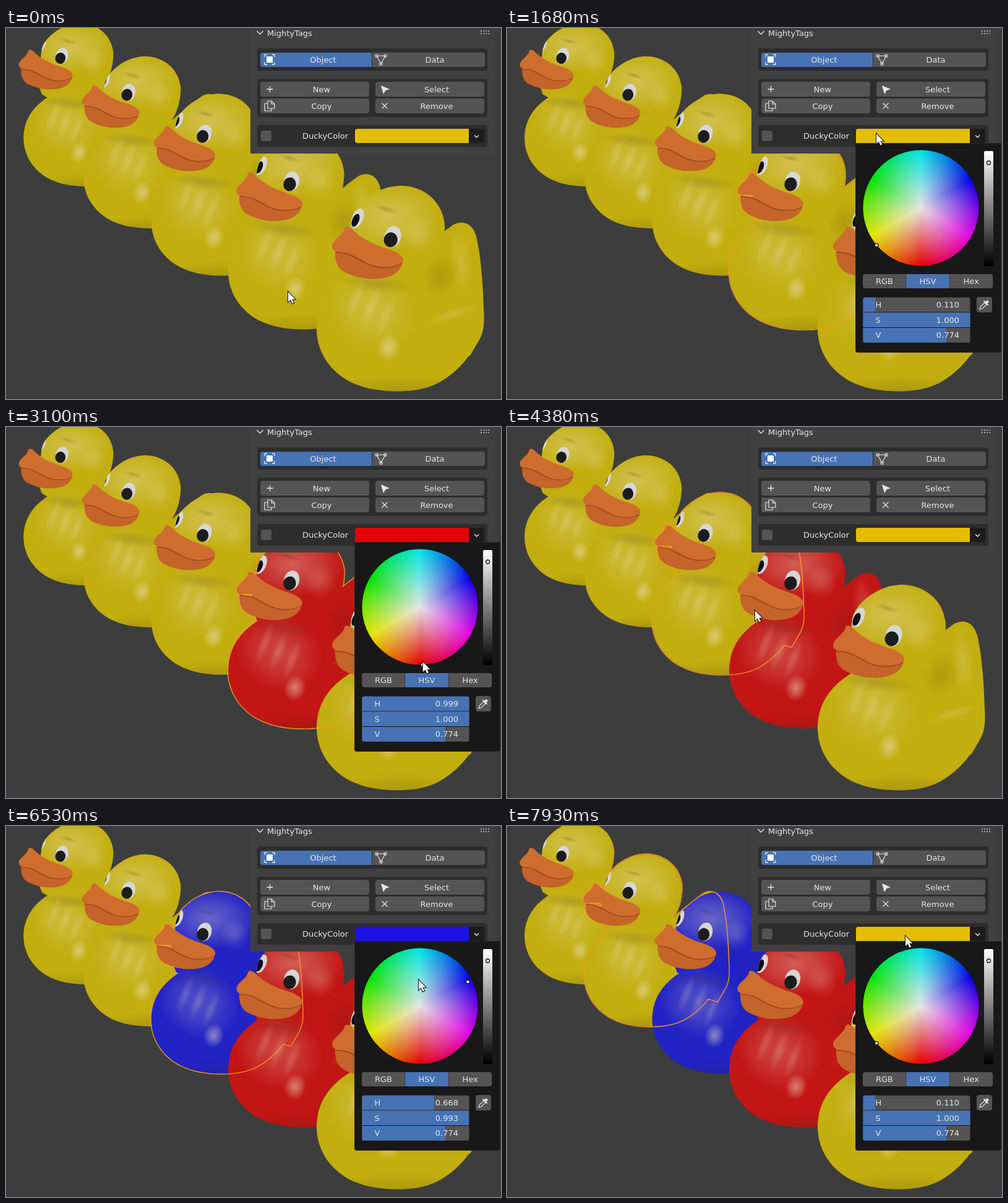
An HTML page with a canvas that plays this animation: 800 by 600 pixels, repeating every 8000 ms.

```html
<!DOCTYPE html>
<html lang="en">
<head>
<meta charset="utf-8">
<title>Ducky colours</title>
<style>
html, body { margin: 0; width: 100%; height: 100%; overflow: hidden; background: #3d3d3d; }
canvas { display: block; }
</style>
</head>
<body>
<canvas id="stage" width="800" height="600"></canvas>
<script>
const c = document.getElementById('stage').getContext('2d');
const LOOP = 8000, STEP = 141.8, TAU = Math.PI * 2;
const WHEEL = { x: 669, y: 291, r: 93.5 }, VALUE = 227.8;
const GREY = '#545454', BLUE = '#4772b3', TEXT = '#e6e6e6';
const YELLOW = [597.3, 351.26], RED = [672.95, 384.5];

// The row recedes to one vanishing point: a part of the duck n places back
// is the nearest duck's part shrunk towards that point by 1 / (1 + n * rate).
const VANISH = { x: -1574, y: -865 };
const RATE = { tail: .0714, body: .0739, head: .0766, beak: .0794, left: .0785, right: .0803 };
const SHAPE = {
  tail: 'M750 530L764 506C774 490 773 470 772 455C771 420 768 370 760 337C753 311 731 311 719 321C702 333 680 352 651 376L600 480Z',
  body: 'M562 395C518 420 502 452 502 488C503 530 530 562 565 576C595 589 650 592 685 580C722 567 750 532 764 506C774 490 772 470 771 450C750 415 700 395 690 370Z',
  head: 'M600 430C680 425 709 370 709 318C705 277 672 255 637 255C605 256 580 275 567 291C558 303 557 315 556 325L545 370L558 405Z'
};
const UPPER = new Path2D('M527 354C527 342 545 336 547 324C549 319 556 321 562 328C580 345 600 352 625 360C640 366 644 374 641 379C637 388 620 388 605 386C580 383 570 366 548 363C535 362 528 361 527 354Z');
const LOWER = new Path2D('M532 360C531 378 536 390 550 396C575 408 605 408 622 401C635 395 640 386 641 378L600 376L560 360Z');
const SEAM = new Path2D('M533 363C560 361 570 380 598 386C612 389 630 387 640 381');

function at(x, y, r = 1, ry = r, turn = 0) {
  return new DOMMatrix().translate(x, y).rotate(turn).scale(r, ry);
}
function back(n, part) {
  const f = 1 / (1 + n * RATE[part]);
  return new DOMMatrix([f, 0, 0, f, VANISH.x * (1 - f), VANISH.y * (1 - f)]);
}
const ducks = [4, 3, 2, 1, 0].map(n => {
  const parts = Object.keys(SHAPE).map(name => {
    const p = new Path2D();
    p.addPath(new Path2D(SHAPE[name]), back(n, name));
    return p;
  });
  const hull = new Path2D(), beak = new Path2D();
  parts.forEach(p => hull.addPath(p));
  [UPPER, LOWER].forEach(p => beak.addPath(p, back(n, 'beak')));
  return { n, hull, parts: [...parts, beak] };
});

// Timing
const MOVES = [[271, 1120, 597, 171], [1960, 2667, 674, 380], [3100, 3660, 401, 297],
  [4380, 4956, 610, 172], [5377, 5510, 667, 249], [6530, 7070, 228, 228], [7070, 7500, 644, 178]];
const DRAG = [[5510, 5802, 714.6, 268.65], [5802, 6227, 746.4, 251.9]];

const lerp = (a, b, k) => a + (b - a) * k;
const within = (t, a, b) => t >= a && t < b;
const snap = t => Math.max(0, Math.floor((t - 105) / STEP) * STEP + 130);
function follow(moves, t, x, y) {
  for (const [a, b, u, v] of moves) {
    const k = Math.min(1, Math.max(0, (t - a) / (b - a)));
    const ease = k * k * (3 - 2 * k);
    x = lerp(x, u, ease);
    y = lerp(y, v, ease);
  }
  return [x, y];
}

// Colours: a point on the wheel gives hue and saturation.
function wheelColour([x, y]) {
  const dx = x - WHEEL.x, dy = y - WHEEL.y;
  const hue = ((Math.atan2(dy, dx) - Math.PI / 2) / TAU + 1) % 1;
  const sat = Math.min(1, Math.hypot(dx, dy) / WHEEL.r);
  return [5, 3, 1].map(n => {
    const k = (n + hue * 6) % 6;
    return VALUE * (1 - sat * Math.max(0, Math.min(k, 4 - k, 1)));
  });
}
function linearHsv(rgb) {
  const [r, g, b] = rgb.map(v => v / 255 <= .04045 ? v / 255 / 12.92 : ((v / 255 + .055) / 1.055) ** 2.4);
  const hi = Math.max(r, g, b), d = hi - Math.min(r, g, b);
  const h = !d ? 0 : hi === r ? (g - b) / d + 6 : hi === g ? (b - r) / d + 2 : (r - g) / d + 4;
  return [h / 6 % 1, d / hi, hi];
}
const css = rgb => `rgb(${rgb.map(Math.round)})`;
const skin = ([r, g, b]) => css([r * .8 + 12, g * .8 + 22, b * .8 + 14]);

function box(x, y, w, h, fill, r = 4) {
  c.beginPath();
  c.roundRect(x, y, w, h, r);
  c.fillStyle = fill;
  c.fill();
}
function text(s, x, y, align = 'center') {
  c.font = '13px "DejaVu Sans", sans-serif';
  c.textAlign = align;
  c.fillStyle = TEXT;
  c.fillText(s, x, y);
}
function line(d, width = 1.3, colour = TEXT) {
  c.strokeStyle = colour;
  c.lineWidth = width;
  c.stroke(new Path2D(d));
}
function shape(path, colour = TEXT) {
  c.fillStyle = colour;
  c.fill(path);
}
function dot(x, y, r) {
  c.beginPath();
  c.arc(x, y, r, 0, TAU);
  c.fillStyle = '#fff';
  c.fill();
  c.strokeStyle = '#111';
  c.lineWidth = 1.3;
  c.stroke();
}

// Soft light (tone > 0) or shade (tone < 0) in the nearest duck's coordinates.
function glow(base, x, y, rx, ry, turn, tone) {
  const ink = tone > 0 ? '240,228,205' : '35,25,10', a = Math.abs(tone);
  const g = c.createRadialGradient(0, 0, 0, 0, 0, 1);
  [1, .55, 0].forEach((v, i) => g.addColorStop(i / 2, `rgba(${ink},${a * v})`));
  c.setTransform(base.multiply(at(x, y, rx, ry, turn)));
  c.fillStyle = g;
  c.fillRect(-1, -1, 2, 2);
}
function oval(base, x, y, rx, ry, turn, colour) {
  c.setTransform(base);
  c.beginPath();
  c.ellipse(x, y, rx, ry, turn, 0, TAU);
  c.fillStyle = colour;
  c.fill();
}

function drawDuck({ n, hull }, rgb) {
  const body = back(n, 'body'), head = back(n, 'head');
  const left = back(n, 'left'), right = back(n, 'right');
  c.save();
  shape(hull, skin(rgb));
  c.clip(hull);
  glow(body, 640, 594, 140, 34, 0, -.16);
  glow(body, 598, 414, 60, 15, 6, -.16);
  glow(body, 702, 400, 28, 36, 25, -.12);
  glow(body, 590, 455, 78, 66, 25, .24);
  for (let i = 0; i < 3; i++) glow(body, 565 + i * 24, 440 + i * 14, 10, 38, 22, .2);
  glow(body, 618, 517, 19, 23, 15, .5);
  glow(body, 736, 378, 18, 55, -6, .2);
  glow(body, 722, 463, 46, 9, -18, .2);
  glow(head, 620, 305, 88, 56, 0, .34);
  glow(head, 668, 335, 28, 30, 0, .2);
  glow(head, 614, 293, 20, 5, 15, -.18);
  oval(left, 568, 308, 9, 17, .4, '#d6d6d6');
  oval(left, 565, 311, 5.4, 11, .4, '#0c0c0c');
  oval(right, 625, 337.5, 13.3, 17.5, .25, '#d6d6d6');
  oval(right, 621.7, 342.5, 11, 12, .2, '#1c1c1c');
  c.restore();

  c.save();
  c.setTransform(back(n, 'beak'));
  shape(LOWER, '#c4632a');
  shape(UPPER, '#cf6d2f');
  c.strokeStyle = 'rgba(120,50,15,.5)';
  c.lineWidth = 1.8;
  c.stroke(SEAM);
  c.restore();
}

// Clipping away every part leaves only the outer edge; it shows through ducks in front.
function drawOutline({ parts }) {
  c.save();
  for (const p of parts) {
    const outside = new Path2D();
    outside.rect(-200, -200, 1200, 1000);
    outside.addPath(p);
    c.clip(outside, 'evenodd');
  }
  c.strokeStyle = 'rgba(247,154,44,.9)';
  c.lineWidth = 3;
  c.lineJoin = 'round';
  parts.forEach(p => c.stroke(p));
  c.restore();
}

function drawPanel(swatch, open) {
  c.fillStyle = '#404040';
  c.fillRect(395, 0, 395, 203);
  line('M405.5 5L410.5 10L415.5 5');
  text('MightyTags', 422, 13, 'left');
  c.fillStyle = '#a0a0a0';
  for (let i = 0; i < 8; i++) c.fillRect(767 + i % 4 * 4, i < 4 ? 4 : 8, 2, 2);

  box(406, 33, 372, 36, '#2d2d2d');
  box(406, 82, 372, 62, '#2d2d2d');
  box(406, 157, 372, 35, '#2d2d2d');
  box(411, 40, 180, 23, BLUE, [4, 0, 0, 4]);
  box(592, 39.5, 182, 23.5, GREY, [0, 4, 4, 0]);
  text('Object', 512.5, 56);
  text('Data', 693, 56);
  ['New', 'Select', 'Copy', 'Remove'].forEach((s, i) => {
    const x = 411 + i % 2 * 186, y = i < 2 ? 87 : 114;
    box(x, y, 176, 24, GREY);
    text(s, x + 99, y + 17);
  });

  c.fillStyle = '#fff';
  c.fillRect(421, 46, 10, 10);
  line('M418 47V43H422M430 43H434V47M434 55V59H430M422 59H418V55');
  line('M599 45L606 58L613 45Z', 1.1);
  line('M597 43h4v4h-4zM611 43h4v4h-4zM604 56h4v4h-4z', 1);
  line('M426.5 94V104M421.5 99H431.5');
  shape(new Path2D('M606 93L620 99L613.5 101L610 107Z'));
  line('M423 118H429L434 123V130H423ZM429 118V123H434M423 122H418V134H429V130', 1.2);
  line('M607.5 121.5L616.5 130.5M616.5 121.5L607.5 130.5');

  box(412, 166, 17, 17, GREY, 3);
  text('DuckyColor', 479, 179, 'left');
  box(564, 163, 184, open ? 24 : 23, swatch, open ? [4, 0, 0, 0] : [4, 0, 0, 4]);
  box(748, 163, 25, 23, '#1c1c1c', [0, 4, 4, 0]);
  line('M757 173.5L760.5 177L764 173.5', 1.5);
}

function drawPopup(mark, rgb) {
  const { x, y, r } = WHEEL;
  box(563, 186, 236, 339, '#252525', [0, 0, 4, 4]);
  box(564, 187, 234, 337, '#181818', [0, 0, 4, 4]);

  const hues = c.createConicGradient(Math.PI / 2, x, y);
  for (let i = 0; i <= 6; i++) {
    const a = Math.PI / 2 + i * TAU / 6;
    hues.addColorStop(i / 6, css(wheelColour([x + Math.cos(a) * r, y + Math.sin(a) * r])));
  }
  const fade = c.createRadialGradient(x, y, 0, x, y, r);
  fade.addColorStop(0, 'rgba(228,228,228,1)');
  fade.addColorStop(1, 'rgba(228,228,228,0)');
  c.beginPath();
  c.arc(x, y, r, 0, TAU);
  for (const fill of [hues, fade]) {
    c.fillStyle = fill;
    c.fill();
  }
  const bar = c.createLinearGradient(0, 199, 0, 384);
  bar.addColorStop(0, '#fff');
  bar.addColorStop(1, '#000');
  box(771, 199, 15, 186, bar, 2);
  dot(778.5, 218, 3);
  dot(...mark, 2.9);

  ['RGB', 'HSV', 'Hex'].forEach((s, i) => {
    box(575 + i * 70.2, 398, 69.8, 23, i === 1 ? BLUE : GREY, [[4, 0, 0, 4], 0, [0, 4, 4, 0]][i]);
    text(s, 610 + i * 70, 414);
  });

  c.save();
  c.beginPath();
  c.roundRect(575.5, 435.5, 173, 74, 4);
  c.clip();
  linearHsv(rgb).forEach((v, i) => {
    const top = 435.5 + i * 24.7;
    box(575, top, 174, 23.8, GREY, 0);
    box(575, top, 1 + 173 * v, 23.8, BLUE, 0);
    text('HSV'[i], 595.5, top + 16.5, 'left');
    text(v.toFixed(3), 731, top + 16.5, 'right');
  });
  c.restore();

  box(759, 435, 25, 25, GREY);
  line('M764 455L765 451L772 444L775 447L768 454Z', 1.2);
  line('M770.5 441.5L777.5 448.5', 2);
  line('M774.5 444.5L777.5 441.5', 4.5);
}

function drawMouse([x, y]) {
  c.save();
  c.translate(x, y);
  const arrow = 'M0 0V16L3.7 12.6L6.6 18.6L9.2 17.4L6.4 11.7H11.3Z';
  line(arrow, 2, '#111');
  shape(new Path2D(arrow), '#fff');
  c.restore();
}

function draw(time) {
  const t = snap(time % LOOP);
  const active = t < 130 ? -1 : t < 4380 ? 3 : t < 7070 ? 2 : 1;
  const open = within(t, 1250, 3240) || within(t, 5090, 6790) || t >= 7640;
  const marks = ducks.map(() => YELLOW);
  if (t >= 2809) marks[3] = RED;
  if (t >= 5510) marks[2] = follow(DRAG, t, 667, 249);
  const mark = marks[active] || YELLOW, rgb = wheelColour(mark);

  c.fillStyle = '#3d3d3d';
  c.fillRect(0, 0, 800, 600);
  ducks.forEach((duck, i) => drawDuck(duck, wheelColour(marks[i])));
  if (active >= 0) drawOutline(ducks[active]);
  drawPanel(css(rgb), open);
  if (open) drawPopup(mark, rgb);
  if (!within(t, 2809, 2950) && !within(t, 5510, 6360)) drawMouse(follow(MOVES, t, 456, 427));
}

const start = performance.now();
function frame() {
  draw(performance.now() - start);
  requestAnimationFrame(frame);
}
frame();
</script>
</body>
</html>
```
